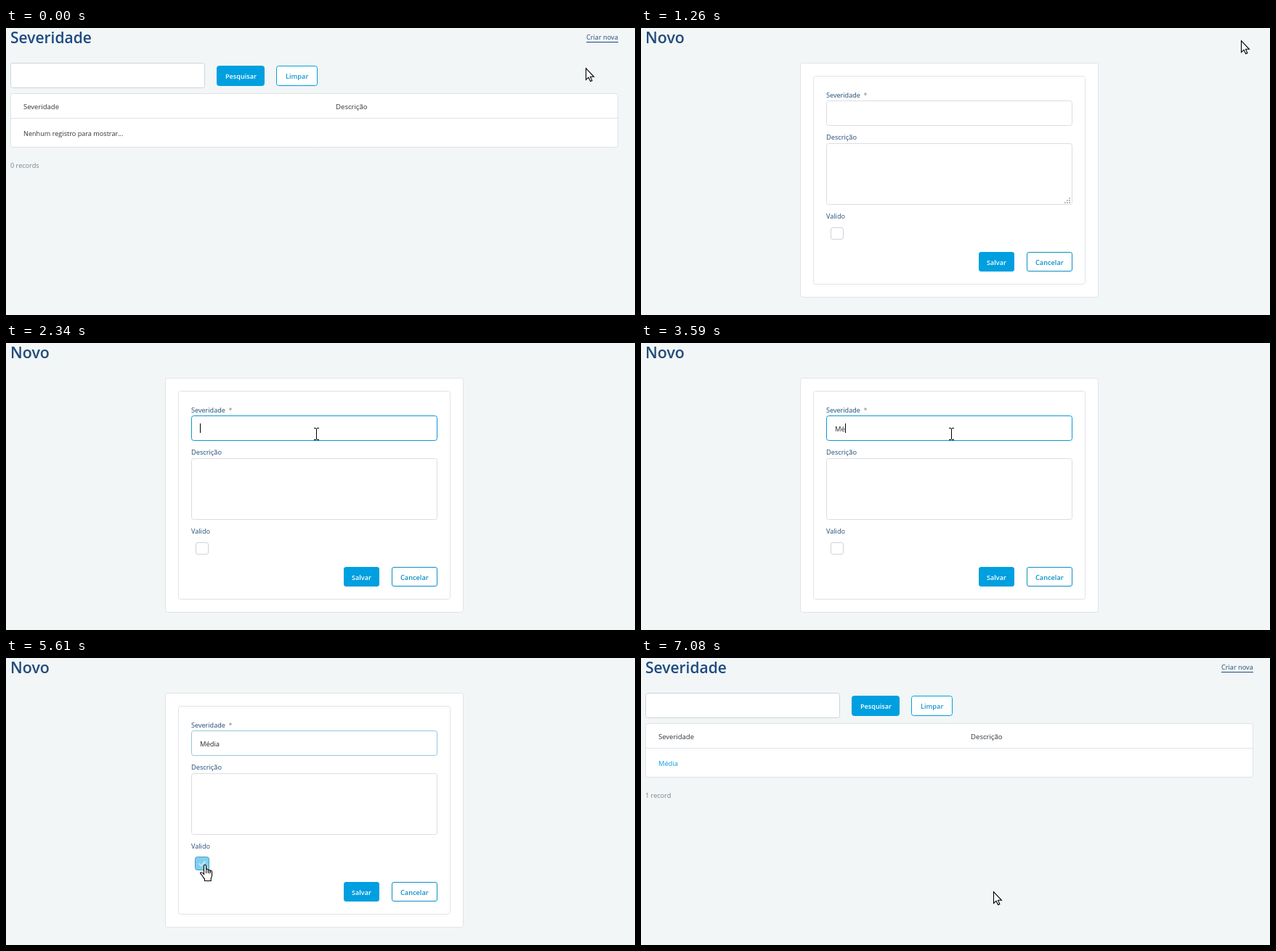
Recreate the animation shown at these times as an HTML page with a canvas. Size 866 px wide and 396 px high, loop 7470 ms.

```html
<!DOCTYPE html>
<html lang="pt">
<head>
<meta charset="utf-8">
<title>Severidade</title>
<style>
html, body { margin: 0; width: 100%; height: 100%; overflow: hidden; background: #f2f6f7; }
canvas { display: block; }
</style>
</head>
<body>
<canvas id="stage" width="866" height="396"></canvas>
<script>
const ctx = document.getElementById('stage').getContext('2d');
const LOOP = 7470, TICK = 80;
const FORM_OPEN = 1260, FORM_CLOSE = 7000;
const FAMILY = '"Open Sans", "Noto Sans", sans-serif';

const BLUE = [0, 159, 223], DARK_BLUE = [0, 143, 198], WHITE = [255, 255, 255];
const LINE = [218, 221, 224], HOVER_LINE = [172, 176, 188], FOCUS_LINE = [10, 152, 208];
const NAVY = '#1f4a76', INK = '#30363c';

const LINK = [799, 5, 44, 16];
const NAME = [255, 100, 339, 35];
const NOTES = [255, 159, 339, 85];
const CHECK = [261, 275, 18, 17];
const SAVE = [465, 309, 49, 27];

// start, end, number of steps, x, y reached
const MOVES = [
  [0, 0, 1, 798, 55],
  [90, 240, 3, 821, 21],
  [390, 710, 5, 819, 6],
  [860, 860, 1, 827, 6],
  [1260, 1260, 1, 826, 17],
  [1340, 1880, 8, 415, 114],
  [1960, 1960, 1, 419, 117],
  [2030, 2340, 5, 427, 125],
  [4750, 5450, 10, 273, 286],
  [5690, 6310, 9, 486, 321],
  [7080, 7080, 1, 485, 322]
];
const KEY_TIMES = [3040, 3590, 3830, 3910, 4060];
const CARET_TOGGLES = [2110, 2660, 3210, 3740, 4290, 4750, 5290, 5530];

const css = c => `rgb(${c.map(Math.round).join(',')})`;
const mix = (a, b, k) => a.map((v, i) => v + (b[i] - v) * k);
const inside = (p, [x, y, w, h]) => p.x >= x && p.x < x + w && p.y >= y && p.y < y + h;
const passed = (times, t) => times.filter(v => t >= v).length;

// Fades advance in the same coarse ticks as the pointer
function fade(t, start, length) {
  if (t < start) return 0;
  return Math.min(1, (Math.floor((t - start) / TICK) + 1) * TICK / length);
}

function pointerAt(t) {
  let x = MOVES[0][3], y = MOVES[0][4];
  for (const [start, end, steps, tx, ty] of MOVES) {
    if (t < start) break;
    const gap = (end - start) / Math.max(1, steps - 1) || 1;
    const k = Math.min(1, (Math.floor((t - start) / gap + 0.1) + 1) / steps);
    const e = k * k * (3 - 2 * k);
    x += (tx - x) * e;
    y += (ty - y) * e;
  }
  return { x: Math.round(x), y: Math.round(y) };
}

function box([x, y, w, h], fill, line, r = 3) {
  ctx.beginPath();
  ctx.roundRect(x + 0.5, y + 0.5, w - 1, h - 1, r);
  ctx.fillStyle = fill;
  ctx.fill();
  ctx.lineWidth = 1;
  ctx.strokeStyle = line;
  ctx.stroke();
}

function text(s, x, y, size, color, weight = 400) {
  ctx.font = `${weight} ${size}px ${FAMILY}`;
  ctx.fillStyle = color;
  ctx.fillText(s, x, y);
}

function rect(x, y, w, h, color) {
  ctx.fillStyle = color;
  ctx.fillRect(x, y, w, h);
}

function drawList(t, p) {
  const saved = t >= FORM_CLOSE;
  text('Severidade', 6, 21, 21, '#1d4a80', 600);

  const linkColor = inside(p, LINK) ? '#0788c0' : NAVY;
  text('Criar nova', 799, 16, 9.2, linkColor);
  rect(799, 19, 44, 1, linkColor);

  box([6, 48, 268, 35], '#fff', '#ced4da');
  box([290, 52, 66, 28], css(BLUE), css(BLUE));
  text('Pesquisar', 302, 70, 9.1, '#fff', 600);
  box([372, 52, 57, 28], '#fff', css(BLUE));
  text('Limpar', 385, 70, 9.2, '#1496cf', 600);

  box([6, 90, 837, 75], '#fff', '#dee2e6');
  rect(7, 124, 835, 1, '#dee2e6');
  text('Severidade', 24, 112, 9.5, INK);
  text('Descrição', 454, 112, 9.6, INK);
  if (saved) text('Média', 24, 149, 9.3, '#0a9bd8');
  else text('Nenhum registro para mostrar...', 24, 149, 9.15, INK);
  text(saved ? '1 record' : '0 records', 6, 193, 9.15, '#7b838b');
}

function drawName(t, p) {
  let line = inside(p, NAME) ? HOVER_LINE : LINE;
  line = mix(line, FOCUS_LINE, fade(t, 2030, 320) - fade(t, 5530, 240));
  box(NAME, '#fff', css(line));

  const typed = 'Média'.slice(0, passed(KEY_TIMES, t));
  text(typed, 267, 122, 9.4, '#20252a');
  if (passed(CARET_TOGGLES, t) % 2) {
    rect(267 + Math.round(ctx.measureText(typed).width), 111, 1, 13, '#000');
  }
}

function drawNotes(t, p) {
  box(NOTES, '#fff', css(inside(p, NOTES) ? HOVER_LINE : LINE));
  if (t >= 1340) return;
  for (let row = 0; row < 3; row++) {
    for (let col = 2 - row; col < 3; col++) {
      rect(583 + col * 3, 234 + row * 3, 2, 2, '#b9bcc0');
    }
  }
}

function drawCheck(t) {
  const k = fade(t, 5530, 320);
  const fill = css(mix(WHITE, BLUE, k));
  const focused = t >= 5530 && t < 6390;
  if (focused) box([260, 274, 20, 19], fill, '#4a9cc4');
  else box(CHECK, fill, k ? fill : '#ced4da', 2.5);
  if (!k) return;
  ctx.beginPath();
  ctx.moveTo(265.5, 283.5);
  ctx.lineTo(268.7, 286.7);
  ctx.lineTo(274.7, 280);
  ctx.lineWidth = 2;
  ctx.strokeStyle = `rgba(255,255,255,${k})`;
  ctx.stroke();
}

function drawForm(t, p) {
  text('Novo', 6, 21, 21.4, '#244c79', 600);
  box([219, 48, 411, 324], '#fff', '#dfe3e6');
  box([237, 66, 375, 288], '#fff', '#dfe3e6');

  text('Severidade', 255, 96, 9.1, NAVY);
  text('*', 306.5, 96, 9, '#8d7f88');
  text('Descrição', 255, 154, 9.25, NAVY);
  text('Valido', 255, 263, 9.1, NAVY);
  drawName(t, p);
  drawNotes(t, p);
  drawCheck(t);

  const save = css(mix(BLUE, DARK_BLUE, fade(t, 6230, 240)));
  box(SAVE, save, save, 2.5);
  text('Salvar', 476, 327, 9.1, '#fff', 600);
  box([531, 309, 63, 27], '#fff', '#0c8fc4', 2.5);
  text('Cancelar', 543, 327, 9.2, '#0c8fc4', 600);
}

const ARROW = new Path2D('M.5 .7V16.4L4 13.2L6.6 18.6L8.9 17.6L6.5 12.3H11.4Z');
const HAND = new Path2D('M5.5 13.5V2.2Q5.5 .5 7 .5Q8.5 .5 8.5 2.2V7.6Q8.7 6.3 10 6.3' +
  'Q11.3 6.3 11.4 8.2Q11.6 7 12.7 7Q14 7 14.1 9.2Q14.3 8.2 15.2 8.2Q16.5 8.2 16.5 10' +
  'V15Q16.5 17 15.2 19V22.5H6.5V20Q4.5 18 3 15L.8 12.4Q.2 11 1.5 10.7Q2.8 10.5 4 12Z');

function shape(path, x, y) {
  ctx.save();
  ctx.translate(x, y);
  ctx.fillStyle = '#fff';
  ctx.fill(path);
  ctx.lineWidth = 1.1;
  ctx.strokeStyle = '#000';
  ctx.stroke(path);
  ctx.restore();
}

function drawPointer(p, form) {
  const hands = form ? [CHECK, SAVE] : [LINK];
  if (form && (inside(p, NAME) || inside(p, NOTES))) {
    rect(p.x, p.y - 7, 1, 15, '#000');
    for (const y of [p.y - 8, p.y + 8]) {
      rect(p.x - 3, y, 3, 1, '#000');
      rect(p.x + 1, y, 3, 1, '#000');
    }
  } else if (hands.some(r => inside(p, r))) {
    shape(HAND, p.x - 6, p.y - 1);
    if (form) {
      ctx.lineWidth = 1;
      ctx.strokeStyle = '#000';
      ctx.beginPath();
      for (const dx of [2.5, 5.3, 8]) {
        ctx.moveTo(p.x + dx, p.y + 7);
        ctx.lineTo(p.x + dx, p.y + 11);
      }
      ctx.stroke();
    }
  } else {
    shape(ARROW, p.x, p.y);
  }
}

function draw(t) {
  const p = pointerAt(t);
  const form = t >= FORM_OPEN && t < FORM_CLOSE;
  rect(0, 0, 866, 396, '#f2f6f7');
  if (form) drawForm(t, p);
  else drawList(t, p);
  drawPointer(p, form);
}

const begin = performance.now();
function frame() {
  draw((performance.now() - begin) % LOOP);
  requestAnimationFrame(frame);
}
frame();
</script>
</body>
</html>
```
